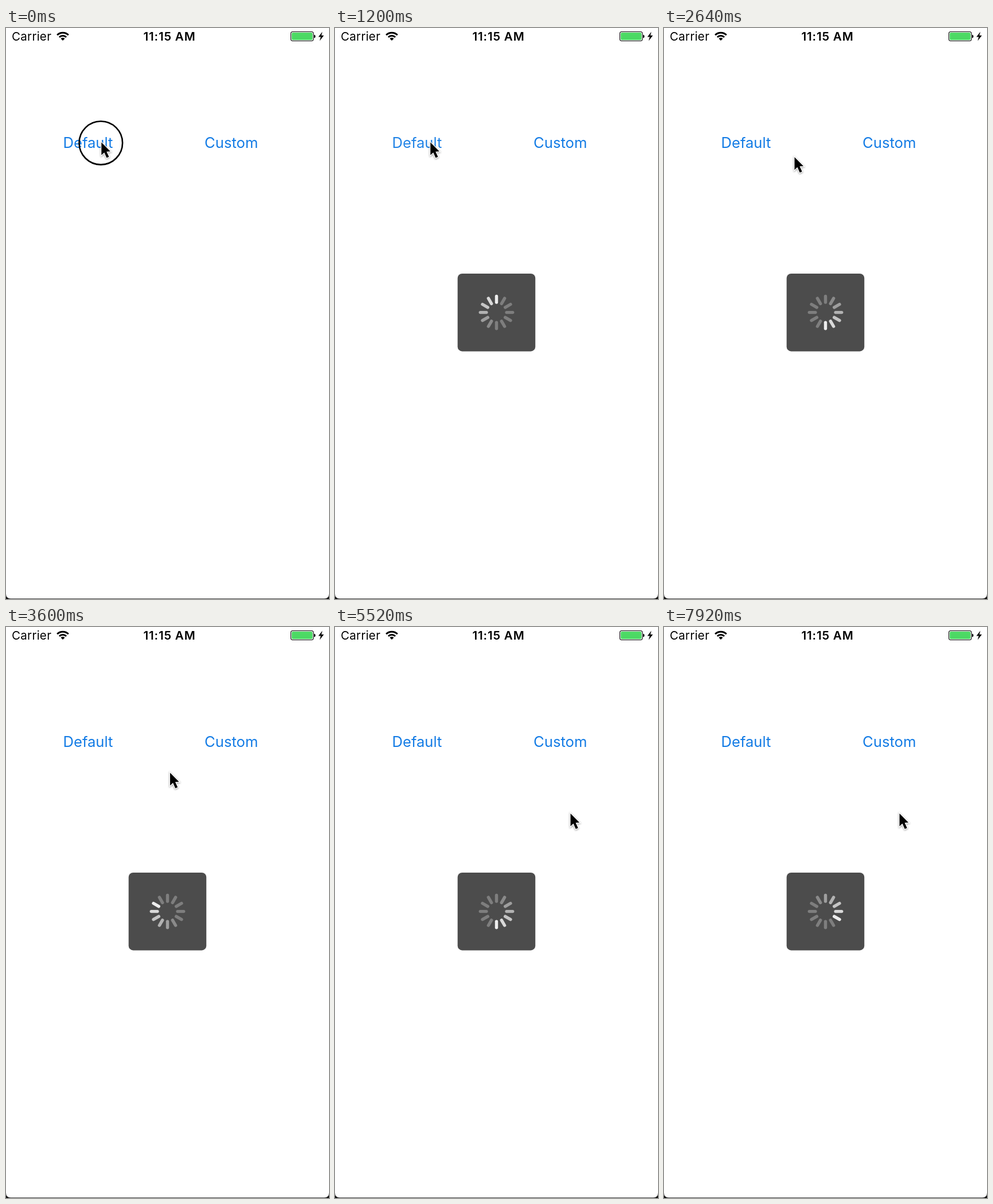
Recreate the animation shown at these times as an HTML page. Size 563 by 995 pixels, loop 8000 ms.

```html
<!DOCTYPE html>
<html lang="en">
<head>
<meta charset="utf-8">
<title>Loading indicator</title>
<style>
  html, body { margin: 0; width: 100%; height: 100%; overflow: hidden; background: #111; }
  svg { display: block; width: 563px; height: 995px; font-family: Inter, Roboto, sans-serif; }
  .status { font-size: 20.6px; letter-spacing: .25px; }
  .time { font-weight: 600; letter-spacing: .8px; text-anchor: middle; }
  .button { font-size: 25.6px; fill: #147ce5; text-anchor: middle; }
  #cursor { filter: drop-shadow(0 1.5px 1.5px rgba(0, 0, 0, .4)); }
</style>
</head>
<body>
<svg viewBox="0 0 563 995">
  <path fill="#fff" d="M0 0H563V986Q563 994.3 555 994.3H8Q0 994.3 0 986Z"/>

  <g class="status">
    <text x="10" y="22.3">Carrier</text>
    <text class="time" x="285" y="22.3">11:15 AM</text>
  </g>
  <g fill="none" stroke="#000" stroke-width="3">
    <path d="M89.2 12.2A14 14 0 0 1 108.8 12.2"/>
    <path d="M92.9 16A8.8 8.8 0 0 1 105.1 16"/>
  </g>
  <path d="M99 22L95.5 18.5A5 5 0 0 1 102.5 18.5Z"/>
  <rect x="496.5" y="6.5" width="39.3" height="16" rx="3.2" fill="#fff" stroke="#000" stroke-width="1.1"/>
  <rect x="498" y="8" width="36.2" height="13" rx="2" fill="#4cd964"/>
  <path d="M537 11.8Q539.4 12 539.4 14.6T537 17.4Z"/>
  <path d="M551.5 6.5L544.5 15.5H548.6L546.7 22.5L554 13H549.7Z"/>

  <text id="default" class="button" x="143" y="208.9">Default</text>
  <text class="button" x="392.7" y="208.9">Custom</text>

  <rect id="panel" x="213.7" y="428" width="135.5" height="135.4" rx="8"/>
  <g id="spinner" transform="translate(281.5 495.6)" stroke="#fff" stroke-width="5.4" stroke-linecap="round"></g>

  <circle id="ring" cx="165.3" cy="200.3" r="37.8" fill="none" stroke="#000" stroke-width="2.6"/>
  <path id="cursor" d="M0 0V22.3L5 17.6L9.2 27L13.2 25.2L9 16.1L15.6 15.8Z"
        stroke="#fff" stroke-width="2.6" paint-order="stroke"/>
</svg>
<script>
  const LOOP = 8000, STEP = 240, SPOKES = 12;
  const el = id => document.getElementById(id);
  const clamp = v => Math.min(1, Math.max(0, v));
  const progress = (t, start, end) => clamp((t - start) / (end - start));
  const smooth = p => p * p * (3 - 2 * p);

  const spokes = Array.from({ length: SPOKES }, (_, i) => {
    const line = document.createElementNS("http://www.w3.org/2000/svg", "line");
    line.setAttribute("y1", -17.6);
    line.setAttribute("y2", -28.2);
    line.setAttribute("transform", `rotate(${i * 360 / SPOKES})`);
    return el("spinner").appendChild(line);
  });

  // Each stop: time, x, y, easing used on the way there.
  const stops = [
    [1440, 166.3, 199.3],
    [2640, 227.5, 225, p => p * p],
    [3600, 286, 254, p => p],
    [4560, 410.5, 325, smooth]
  ];

  function cursorAt(t) {
    let [start, x, y] = stops[0];
    for (const [end, toX, toY, ease] of stops.slice(1)) {
      const p = ease(progress(t, start, end));
      x += (toX - x) * p;
      y += (toY - y) * p;
      start = end;
    }
    return [x, y];
  }

  function draw() {
    const step = Math.floor(performance.now() % LOOP / STEP);
    const t = step * STEP;

    el("ring").style.display = t < 240 ? "" : "none";
    el("default").style.opacity = t < 240 ? 1 : 0.2 + 0.8 * smooth(progress(t, 240, 1400));
    el("panel").style.opacity = 0.7 * smooth(progress(t, 400, 1200));
    el("spinner").style.display = t < 480 ? "none" : "";

    const head = step + 7;
    spokes.forEach((spoke, i) => {
      const age = (head - i + SPOKES) % SPOKES;
      spoke.style.opacity = Math.max(0.28, 0.9 - 0.11 * age);
    });

    el("cursor").setAttribute("transform", `translate(${cursorAt(t)})`);
    requestAnimationFrame(draw);
  }
  draw();
</script>
</body>
</html>
```
